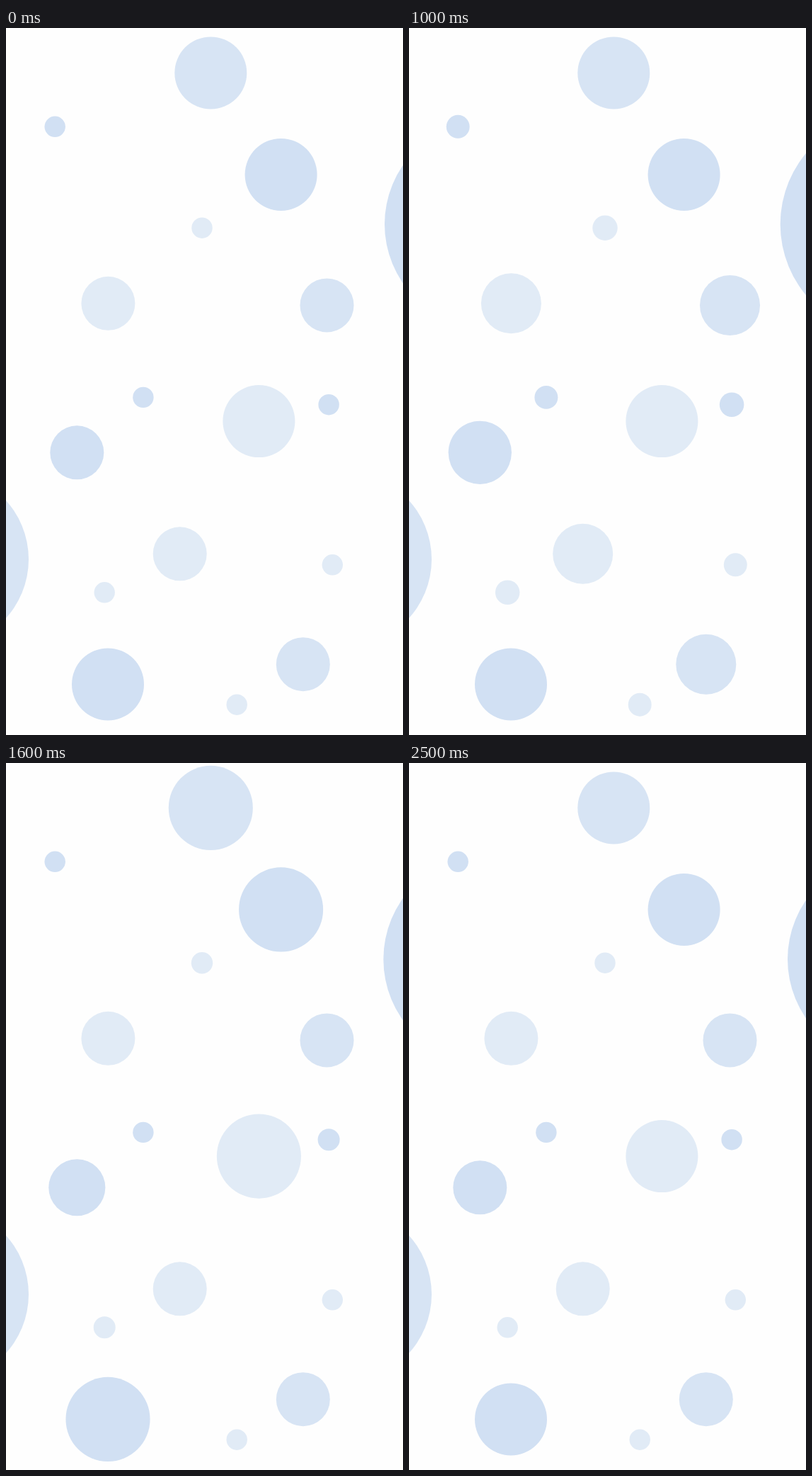
Animation of 561 by 998 pixels, one loop 2600 ms. Source, as an HTML page with a canvas:

```html
<!DOCTYPE html>
<html lang="en">
<head>
<meta charset="utf-8">
<title>Pulsing bubbles</title>
<style>
  html, body { margin: 0; width: 100%; height: 100%; overflow: hidden; background: #fefefe; }
  canvas { display: block; width: 561px; height: 998px; }
</style>
</head>
<body>
<canvas id="stage" width="561" height="998"></canvas>
<script>
const LOOP = 2600, STEP = 100;
const DARK = '#d1e0f3', MID = '#d7e4f4', LIGHT = '#e1ebf6';
const S = 14.7, M = 38, L = 51;

// Each group swells linearly for `half` ms from `start`, then shrinks back.
// Bubble: x, y, radius, colour
const groups = [
  { start: 0, half: 1, gain: 0, bubbles: [
    [-91.6, 750, 123.6, MID]
  ] },
  { start: 40, half: 674, gain: 0.206, bubbles: [
    [69.2, 139.3, S, DARK],
    [144.4, 388.8, M, LIGHT],
    [453.5, 391.4, M, MID],
    [193.9, 521.4, S, DARK],
    [245.7, 742.3, M, LIGHT],
    [461.3, 757.8, S, LIGHT],
    [419.8, 898.2, M, MID],
    [326.2, 955.2, S, LIGHT]
  ] },
  { start: 367, half: 668, gain: 0.215, bubbles: [
    [277, 282.2, S, LIGHT]
  ] },
  { start: 367, half: 668, gain: 0.0743, bubbles: [
    [681.5, 277, 146.5, DARK]
  ] },
  { start: 388, half: 700, gain: 0.2, bubbles: [
    [100.3, 599.3, M, DARK],
    [139.2, 796.8, S, LIGHT],
    [456.1, 531.7, S, DARK]
  ] },
  { start: 1014, half: 700, gain: 0.2, bubbles: [
    [289.3, 63.4, L, MID],
    [388.6, 206.9, L, DARK],
    [357.4, 555.1, L, LIGHT],
    [144, 926.4, L, DARK]
  ] }
];

const ctx = document.getElementById('stage').getContext('2d');
const began = performance.now();

const pulse = (t, { start, half, gain }) =>
  1 + gain * Math.max(0, 1 - Math.abs(t - start - half) / half);

function draw(t) {
  ctx.fillStyle = '#fefefe';
  ctx.fillRect(0, 0, 561, 998);
  for (const group of groups) {
    const scale = pulse(t, group);
    for (const [x, y, r, color] of group.bubbles) {
      ctx.fillStyle = color;
      ctx.beginPath();
      ctx.arc(x, y, r * scale, 0, Math.PI * 2);
      ctx.fill();
    }
  }
}

function tick() {
  const t = (performance.now() - began) % LOOP;
  draw(Math.floor(t / STEP) * STEP);
  requestAnimationFrame(tick);
}
tick();
</script>
</body>
</html>
```
